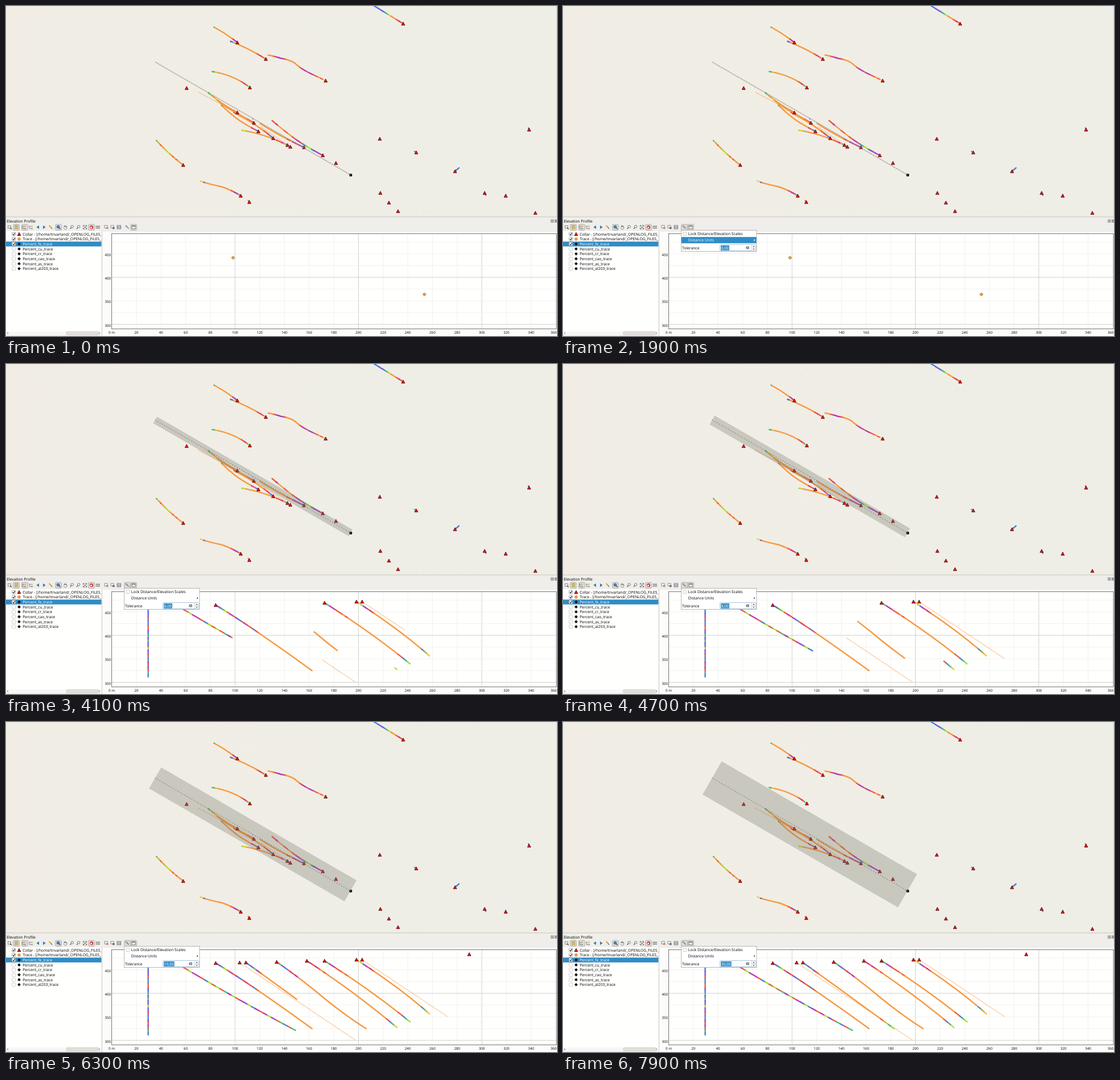
An HTML page that plays this animation: 967 by 579 pixels, repeating every 8000 ms.

```html
<!DOCTYPE html>
<html lang="en">
<head>
<meta charset="utf-8">
<title>Elevation profile tolerance</title>
<style>
html, body { margin: 0; width: 100%; height: 100%; overflow: hidden; background: #efece4; }
svg { display: block; width: 967px; height: 579px; }
text { font: 6.75px "Open Sans", "Noto Sans", sans-serif; fill: #000; white-space: pre; text-rendering: geometricPrecision; }
text.lit { fill: #fff; }
.axis { font-size: 6.2px; }
</style>
</head>
<body>
<svg id="stage" viewBox="0 0 967 579" xmlns="http://www.w3.org/2000/svg">
  <defs>
    <linearGradient id="ground"><stop offset="0" stop-color="#f1ede5"/><stop offset="1" stop-color="#eeeee6"/></linearGradient>
    <clipPath id="mapClip"><rect width="967" height="370"/></clipPath>
    <clipPath id="plotClip"><rect x="186" y="400" width="780" height="166"/></clipPath>
    <clipPath id="treeClip"><rect y="395" width="167.5" height="176"/></clipPath>
  </defs>
  <g clip-path="url(#mapClip)"><g id="map"></g><g id="band"></g></g>
  <g id="panel"></g>
  <g id="profile" clip-path="url(#plotClip)"></g>
  <g id="menu"></g>
</svg>
<script>
const LOOP = 8000, STEP = 100, MENU_OPENS = 1300, FIRST_CLICK = 2800;
const BLUE = '#308cc6';
const ink = { o: '#f7993e', r: '#ef5a3c', m: '#c035b5', p: '#8650dc', b: '#4a83d4',
              g: '#52b878', l: '#9fe032', y: '#dcd63c' };
const $ = id => document.getElementById(id);

const rect = (x, y, w, h, fill, stroke = 'none', rx = 0) =>
  `<rect x="${x}" y="${y}" width="${w}" height="${h}" fill="${fill}" stroke="${stroke}" stroke-width=".8" rx="${rx}"/>`;
const path = (d, stroke = '#666', width = 1, fill = 'none', more = '') =>
  `<path d="${d}" stroke="${stroke}" stroke-width="${width}" fill="${fill}" ${more}/>`;
const text = (x, y, s, more = '') => `<text x="${x}" y="${y}" ${more}>${s}</text>`;
const dot = (x, y, r, fill, stroke = 'none') =>
  `<circle cx="${x}" cy="${y}" r="${r}" fill="${fill}" stroke="${stroke}" stroke-width=".9"/>`;
const collar = (x, y) => path(`M${x} ${y - 2.9}l3 5.6h-6z`, '#4a0808', .8, '#e8101c');
const diamond = (x, y, r, fill, stroke = 'none') =>
  path(`M${x} ${y - r}l${r} ${r}l${-r} ${r}l${-r} ${-r}z`, stroke, .8, fill);
const points = d => d.match(/-?[\d.]+/g).map(Number);

// ---- drill traces ----
// Orange in the middle, with short coloured stretches at both ends.
const grades = (head, tail, n = 24) => head + 'o'.repeat(Math.max(0, n - head.length - tail.length)) + tail;

function mixedGrades(seed, letters, n) {
  let out = '';
  for (let i = 0; i < n; i++) {
    seed = (seed * 16807) % 2147483647;
    out += letters[seed % letters.length];
  }
  return out;
}

// A path painted in equal coloured stretches, shown between the fractions from and to.
function trace(d, colors, from = 0, to = 1, width = 2.4) {
  const n = colors.length;
  let out = '';
  for (const run of colors.matchAll(/(.)\1*/g)) {
    const a = Math.max(run.index, from * n), b = Math.min(run.index + run[0].length, to * n);
    if (b > a) out += path(d, ink[run[1]], width, 'none',
      `pathLength="${n}" stroke-dasharray="${b - a} 999" stroke-dashoffset="${-a}" stroke-linecap="${width > 1 ? 'round' : 'butt'}"`);
  }
  return out;
}
const hairline = (d, from, to) => trace(d, 'o', from, to, .7);

// ---- map: every trace ends at its collar ----
const mapTraces = [
  ['M640 -4L697 31', 'bbbbbbpbpbbgglyo', 'rrmrr'],
  ['M365 37Q386 48 406 64', 'g', 'rmpmr'],
  ['M394 62Q424 73 456 93', 'pb', 'rrmrro'],
  ['M460 86Q475 89 483 92Q502 95 510 103Q520 112 540 121L561 131', 'oormpmr', 'rmmrpmrrory'],
  ['M362 115Q400 121 428 143', 'ggy', 'rrmrgl'],
  ['M264 236Q286 260 311 279', 'gloorooolllylooroor', ''],
  ['M341 307Q350 311 378 317Q394 322 412 333', 'yyp', 'rrmmrg'],
  ['M355 152Q378 172 406 187', 'ggl', 'ror'],
  ['M368 163Q384 178 409 190L435 205', 'y', 'rrrm'],
  ['M378 174Q390 186 403 196T443 220', 'g', 'mrrb'],
  ['M400 187Q438 206 469 232', 'r', 'rrmrbp'],
  ['M414 218Q452 224 494 244', 'ly', 'rrrmog'],
  ['M446 206Q478 227 523 248', '', 'rrommrmrp'],
  ['M467 201Q500 229 519 241T556 262', 'rrmooorr', 'rrmprbgllbmpmm'],
  ['M795 284L788 290', 'b', '', 1],
  ['M425 341L427 344', 'or', '', 2],
  ['M717 255L720 257', 'g', '', 1],
  ['M842 332L840 328', 'b', '', 1],
  ['M877 331V333', 'b', '', 1],
  ['M917 214L918 217', 'b', '', 1]
];
const loneCollars = 'M317 144 499 247 579 275.5 656 233 657 328 672 345 688 360 929 363';

function map() {
  const ends = mapTraces.flatMap(([d]) => points(d.replace('V', ' 877 ')).slice(-2)).concat(points(loneCollars));
  let marks = '';
  for (let i = 0; i < ends.length; i += 2) marks += collar(ends[i], ends[i + 1]);
  return rect(0, 0, 967, 371, 'url(#ground)') +
    hairline('M337 151L409 189') + hairline('M447 212L499 247') +
    mapTraces.map(([d, head, tail, n]) => trace(d, grades(head, tail, n))).join('') +
    marks + path('M966.3 0V370', '#d8d5cc', .8);
}

// Section line and its tolerance corridor.
function band(tol) {
  const [ax, ay, bx, by] = [261.7, 98.2, 604.6, 296.2];
  const len = Math.hypot(bx - ax, by - ay), h = Math.max(.9, tol * 1.12);
  const nx = (by - ay) / len * h, ny = (ax - bx) / len * h;
  const box = `M${ax + nx} ${ay + ny}L${bx + nx} ${by + ny}L${bx - nx} ${by - ny}L${ax - nx} ${ay - ny}z`;
  return path(box, 'none', 0, 'rgba(118,118,106,.32)') +
    path(`M${ax} ${ay}L${bx} ${by}`, tol ? '#75756d' : '#a2a19b', 1.1, 'none', 'stroke-dasharray="1.6 3"') +
    diamond(433, 198, 1.7, '#8ba0b8') +
    rect(603, 294.7, 4, 3.8, '#000', '#000', 1) + dot(604.6, 296.2, .6, '#fff');
}

// ---- panel ----
const pressed = (x, fill = '#dedad5') => rect(x - 5.3, 383.2, 10.6, 10.2, fill, '#a9a49e', 1.5);
const wrench = () => path('M211 386l4.4 4.6', '#777', 1.5) + dot(210.8, 386, 1.5, '#999');

function toolbar() {
  const lens = x => dot(x + .6, 387, 2.2, '#f5f5f5', '#666') + path(`M${x - 1} 388.8l-2 2.2`, '#666', 1.3);
  const page = (x, c) => rect(x - 3, 385, 5, 4.5, '#f4f4f4', '#777') + rect(x, 388, 3.5, 3.2, c);
  const branch = x => path(`M${x - 3} 385v5.5h3M${x - 3} 387h3`, '#777', .8) +
    rect(x, 385.5, 3, 2, '#c9c36a') + rect(x, 389.5, 3, 2, '#9a9a9a');
  return rect(3.5, 385.5, 5, 4.5, 'none', '#777') + path('M7 389l3 2.5', '#444', 1.2) +
    pressed(18) + path('M15 385.5h6.5M15 388h6.5M15 390.5h6.5', '#b9a038', 1.3) +
    pressed(33) + branch(32) + branch(44) +
    path('M58 385v6.2l-4.6-3.1zM65 385v6.2l4.6-3.1z', 'none', 0, '#3c78b4') +
    path('M75.5 385l4 4', '#d8a92c', 2) + path('M79 388.5l2 2.5', '#555', 1.2) +
    pressed(92, '#cfdbe6') + dot(91.5, 387.5, 2.3, '#4d86ba', '#456') + path('M93 389l2.6 2.4', '#333', 1.1) +
    path('M102 388v-2.6M103.5 387.5v-3M105 387.5v-2.6M106.5 388v-1.6M101.8 387.5h4.9v2.5l-1.3 1.8h-2.3l-2.2-2.8', '#777', .9, '#f7f7f7') +
    lens(115.5) + lens(127) +
    path('M135.5 387v-2h2M139 385h2.5v2M141.5 389v2.2h-2M138 391.2h-2.5V389', '#555', 1) + rect(137.2, 386.8, 2.8, 2.6, '#888') +
    pressed(150) + dot(150, 388.2, 2.5, '#fff', '#c4202c') + path('M148 387.5a2.2 2.2 0 1 1 2.8 2.9', '#c4202c', 1.6) +
    path('M157.5 386.5h7.5M157.5 389.5h7.5', '#777', 1.4) +
    page(176, '#c98a70') + page(187, '#667') +
    rect(195, 385, 6.4, 6, '#dce3ea', '#667') + path('M195 387.2h6.4M195 389.2h6.4', '#667', .7) +
    wrench() + pressed(224) + rect(221, 385.3, 6, 5.6, '#f6f6f6', '#666') + path('M221 386.5h6', '#777', 1);
}

function tree() {
  const names = ['Collar - [/home/tnvarland/_OPENLOG_FILES_', 'Trace - [/home/tnvarland/_OPENLOG_FILES_',
    ...['fe', 'cu', 'cr', 'cao', 'as', 'al203'].map(s => `Percent_${s}_trace`)];
  return names.map((name, i) => {
    const y = 400.2 + i * 8.66, sel = i === 2;
    const mark = i === 0 ? collar(23, y) : i === 1 ? diamond(23, y, 2.8, '#f2a23c', '#a86a1c') : diamond(23, y, 2.9, '#111');
    return (sel ? rect(0, y - 4.2, 168, 8.5, BLUE) : '') +
      rect(10.6, y - 3, 6, 6, '#fff', i < 3 ? '#999' : '#c8c5c0', .8) +
      (i < 3 ? path(`M12 ${y}l1.4 1.7l2.4 -3.6`, '#222', 1.1) : '') +
      mark + text(29.3, y + 2.4, name, sel ? 'class="lit"' : '');
  }).join('');
}

function grid() {
  const line = (d, major) => path(d, major ? '#cbcbca' : '#f0f0ee', .9);
  let out = rect(185.5, 399.5, 780.5, 167, '#fffffe');
  for (let m = 0; m <= 360; m += 20) {
    const x = 185.5 + m * 2.165;
    if (m && m < 360) out += line(`M${x} 400V566`, m % 100 === 0);
    out += text(Math.min(x, 961), 575.2, m || '0 m', 'class="axis" text-anchor="middle"');
  }
  for (let e = 300; e <= 475; e += 25) {
    const y = 476 - (e - 400) * .825;
    out += line(`M186 ${y}H966`, e % 100 === 0);
    if (e % 50 === 0) out += text(184, y + 4, e, 'class="axis" text-anchor="end"');
  }
  return out + rect(185.5, 399.5, 780.5, 167, 'none', '#555');
}

function panel() {
  return rect(0, 370, 967, 209, '#efeeea') + path('M0 370H967', '#c9c4bb', 1) +
    text(1.2, 379.8, 'Elevation Profile') +
    rect(956.6, 375, 4.4, 4.4, '#e4e0dc', '#777') + path('M957.5 377.2h2.8M958.8 376v2.6', '#666', .7) +
    rect(963.4, 375, 4.4, 4.4, '#e4e0dc', '#777') + path('M964 375.6l3 3M967 375.6l-3 3', '#555', .9) +
    toolbar() +
    rect(0, 395, 168, 176, '#fffffe') + `<g clip-path="url(#treeClip)">${tree()}</g>` +
    path('M168.2 395V578', '#c8c3bd', .8) +
    rect(0, 571, 168, 6.5, '#f8f7f5') + rect(106, 571.3, 56, 5.8, '#e2dfdb', '#cfcbc6', 1) +
    path('M4 572.6l-1.8 1.6l1.8 1.6M163 572.6l1.8 1.6l-1.8 1.6', '#555', .8) +
    rect(169.5, 396, 798, 183, '#fcfcfb') + grid();
}

// ---- profile ----
// Each trace grows out of the fraction `seed` while the tolerance goes from `first` to `full`.
const section = [
  { d: 'M249.5 424V549', colors: mixedGrades(71, 'rpbbpmgrpl', 29), seed: .5, first: 5, full: 6 },
  { d: 'M300 424L314 432Q406 487 508 541', colors: mixedGrades(23, 'rmrglrmprb', 30), seed: 0, first: 4, full: 13, ease: .5 },
  { d: 'M368 423Q430 460 537 538', colors: grades('bpglrmrpbrmrrbr', '', 34), seed: .18, first: 0, full: 3 },
  { d: 'M410 422L613 558', seed: 1, first: 4, full: 11 },
  { d: 'M421 422Q480 464 581 538', colors: grades('gbpgmr', 'rolgl', 34), seed: 0, first: 9, full: 27 },
  { d: 'M475 421Q520 452 560 486Q600 518 632 538', colors: grades('rgpbrmrm', '', 34), seed: .57, first: 4, full: 11.5 },
  { d: 'M528 419Q610 472 686 536', colors: grades('rmrmror', 'rbgy', 34), seed: 1, first: 5, full: 19, ease: 1.4 },
  { d: 'M559 419Q640 470 709 526', colors: grades('rgmmrrror', 'rrbgl', 34), seed: 1, first: 3, full: 5, ease: 3 },
  { d: 'M615 417Q690 465 743 512', colors: grades('rylpmrmr', 'bgoy', 34), seed: 1, first: 0, full: 6 },
  { d: 'M625 417L775 517', seed: 0, first: 4, full: 8 }
];

function profile(tol) {
  if (!tol) return diamond(398.5, 441.7, 3, '#f2a23c', '#a86a1c') + diamond(734.3, 506, 3, '#f2a23c', '#a86a1c');
  let lines = '', marks = tol >= 13 ? collar(813, 407.5) : '';
  for (const { d, colors, seed, first, full, ease = 1 } of section) {
    if (tol <= first) continue;
    const grown = Math.min(1, (tol - first) / (full - first)) ** ease;
    const from = seed * (1 - grown), to = seed + (1 - seed) * grown;
    lines += colors ? trace(d, colors, from, to) : hairline(d, from, to);
    if (from === 0) marks += collar(...points(d).slice(0, 2));
  }
  return lines + marks;
}

// ---- menu ----
function menu(t, tol) {
  if (t < MENU_OPENS) return '';
  const lit = t < 1700 || t >= 2100 ? 0 : t < 1900 ? 1 : 2;
  const value = tol + ',00';
  const white = on => on ? 'class="lit"' : '';
  return pressed(213) + wrench() +
    rect(207.4, 393.6, 132.4, 37, '#fff', '#aaa5a0') +
    (lit ? rect(207.8, lit === 1 ? 394 : 405.3, 131.6, 11, BLUE) : '') +
    rect(210.9, 396.7, 5.8, 5.8, '#fff', '#c0bcb7', .8) +
    text(219.8, 401.9, 'Lock Distance/Elevation Scales', white(lit === 1)) +
    text(219.8, 413.2, 'Distance Units', white(lit === 2)) +
    path('M335 408.9l2.2 1.9l-2.2 1.9z', 'none', 0, lit === 2 ? '#fff' : '#444') +
    text(209, 426.7, 'Tolerance') +
    rect(275.4, 418.6, 63, 11, '#fff', '#8fb4d0', 1) +
    rect(277, 420, value.length * 3.7, 8.7, BLUE) + text(277.4, 426.7, value, white(true)) +
    path('M320.6 424.2l1.8 -2.4h4.2v4.8h-4.2z', 'none', 0, '#777') + path('M322.8 423l2.4 2.4M325.2 423l-2.4 2.4', '#fff', .7) +
    path('M331 419V429.2M331 424.2H338', '#ccc8c3', .8) +
    path('M333 422.4l1.7 -1.8l1.7 1.8zM333 426l1.7 1.8l1.7 -1.8z', 'none', 0, '#444');
}

// ---- time ----
// The spin box is clicked at a changing pace between these [time, tolerance] points.
const pace = [[FIRST_CLICK, 1], [3300, 4], [4100, 6], [5300, 11], [6300, 19], [6600, 19], [7500, 29], [7800, 30], [LOOP, 30]];

function toleranceAt(t) {
  if (t < FIRST_CLICK) return 0;
  const i = pace.findIndex(p => p[0] > t);
  const [t0, v0] = pace[i - 1], [t1, v1] = pace[i];
  return Math.floor(v0 + (v1 - v0) * (t - t0) / (t1 - t0));
}

function draw(t) {
  const tol = toleranceAt(t);
  $('band').innerHTML = band(tol);
  $('profile').innerHTML = profile(tol);
  $('menu').innerHTML = menu(t, tol);
}

$('map').innerHTML = map();
$('panel').innerHTML = panel();

const start = performance.now();
let last = -1;
function tick() {
  const t = Math.floor((performance.now() - start) % LOOP / STEP) * STEP;
  if (t !== last) draw(last = t);
  requestAnimationFrame(tick);
}
tick();
</script>
</body>
</html>
```
